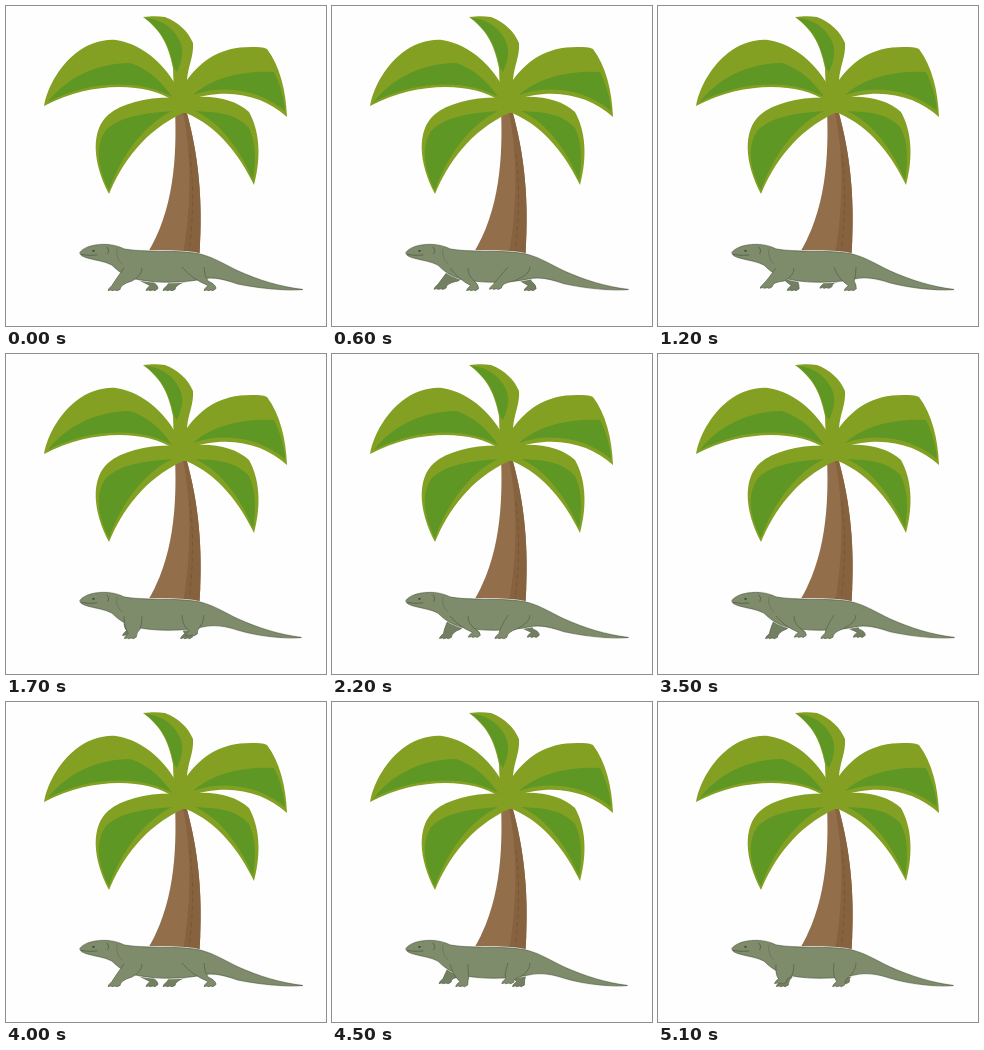
Write an HTML page that moves like this. It is 320 by 320 pixels and loops after 5200 ms.

```html
<!DOCTYPE html>
<html lang="en">
<head>
<meta charset="utf-8">
<title>Lizard under a palm</title>
<style>
  html, body { margin: 0; width: 100%; height: 100%; overflow: hidden; background: #fefefe; }
  svg { display: block; width: 100vw; height: 100vh; }
  .light { fill: #84a022; }
  .dark { fill: #5f9724; }
  .skin { fill: #7e8c6b; stroke: #555f4a; stroke-width: .7; stroke-linejoin: round; }
  .far { fill: #727f61; }
  .line { fill: none; stroke: #4d5644; stroke-width: .7; stroke-linecap: round; }
  .halo { fill: none; stroke: #eeefe9; stroke-width: 2.2; }
</style>
</head>
<body>
<svg viewBox="0 0 320 320">
  <g id="palm">
    <path fill="#936e4a" d="M169 104C171 150 168 205 141 248H193.500C197 195 193 150 180 104Z"/>
    <path fill="#87623f" d="M177 106C186 150 185 205 177 248H193.500C197 195 193 150 180 104Z"/>
    <path fill="none" stroke="#775338" stroke-width=".8" stroke-dasharray="5 3" d="M184 148C188 180 187 215 183 246"/>

    <path class="light" d="M137 11C146 10 152 10 159 11C172 16 182 25 187 37C188 50 182 60 181 74L184 96L168 92L167 62C162 36 153 23 137 11Z"/>
    <path class="dark" d="M139 12C157 13 170 24 175 38C178 48 175 57 171 66L168 62C163 37 154 23 139 12Z"/>

    <path class="light" d="M38 100C42 78 56 58 70 47C82 38 96 33 110 34C138 38 164 62 176 92L168 95C140 76 85 75 38 100Z"/>
    <path class="dark" d="M42 96C60 72 91 57 124 57C143 63 157 77 166 91C138 74 85 73 42 96Z"/>

    <path class="light" d="M181 74C196 54 214 41 245 41C252 41 257 41 261 43C274 60 280 85 281 111C258 90 222 80 180 95Z"/>
    <path class="dark" d="M187 89C204 74 232 64 268 66C274 78 278 91 279 105C256 86 222 77 187 89Z"/>

    <path class="light" d="M178 92C145 90 118 96 102 109C85 124 86 156 103 188C116 157 138 125 177 107Z"/>
    <path class="dark" d="M103 184C91 161 89 139 100 124C116 109 142 107 166 105C136 120 115 151 103 184Z"/>

    <path class="light" d="M170 94C200 87 228 92 243 106C253 124 256 149 248 179C234 150 213 121 180 107L170 107Z"/>
    <path class="dark" d="M247 174C251 151 249 135 243 122C230 107 210 106 189 105C217 118 235 146 247 174Z"/>
  </g>
  <g id="lizard">
    <path id="farHind" class="skin far"/>
    <path id="farFront" class="skin far"/>
    <path id="halo" class="halo"/>
    <path id="body" class="skin"/>
    <g id="face">
      <path class="line" d="M75.500 248.500Q83 250 91 249M101 241Q104 243.500 102 247.500"/>
      <path class="line" stroke-opacity=".5" d="M111 243Q109 252 116 258"/>
      <ellipse cx="87.500" cy="244.800" rx="1.300" ry=".9" fill="#3a4035"/>
    </g>
    <path id="nearHind" class="skin"/>
    <path id="nearFront" class="skin"/>
  </g>
</svg>
<script>
  // The walk restarts after 13 steps, one short of a full 14-step stride.
  const STEP = 100, LOOP = 5200, CLIP = 13, STRIDE = 14;
  const set = (id, d) => document.getElementById(id).setAttribute('d', d);

  // Foot position: a steady push backward, then a lifted swing forward.
  function footAt(phase, front, back, haste) {
    const u = (phase / STRIDE % 1) * 2;
    if (u < 1) return { x: front + (back - front) * u, y: 284.5, push: u };
    const v = u - 1, w = Math.min(1, v * haste);
    return {
      x: back + (front - back) * w * w * (3 - 2 * w),
      y: 284.5 - 3 * Math.sin(Math.PI * v),
      push: 1 - v
    };
  }

  // Open outline from hip to toes and back up, bent at the knee.
  function leg(hipX, hipY, foot, width, bend) {
    const { x, y, push } = foot;
    const kx = (hipX + x) / 2 + bend, ky = 273;
    const heel = y - 1 - push;
    return `M${hipX - width} ${hipY}` +
      `Q${kx - 9} ${ky} ${x - 3} ${y - 5}` +
      `L${x - 6} ${y - 2}L${x - 7} ${y}l3 -.6l1 .8l3 -.7l2 .7` +
      `L${x + 5} ${heel}` +
      `Q${x + 5} ${y - 6} ${kx + 7} ${ky + 2}` +
      `Q${hipX + width} ${hipY + 8} ${hipX + width} ${hipY}`;
  }

  function bodyPath(stretch) {
    const tipX = 296 + stretch * .7;
    return 'M74 246.500C77 242.500 83 240 90 239C100 237.500 110 239 118 243' +
      'C135 246.500 166 244 188 247C204 249 217 258 232 265' +
      `C252 274 274 281 ${tipX} 283.500` +
      `C276 285 250 281.500 232 ${277 + stretch}` +
      `C220 ${273 + stretch} 208 270 196 273C178 277 151 277 135 274` +
      'C121 272 113 266 106 259C99 255 88 254 80 251.500C76 250 74 249 74 246.500Z';
  }

  function draw(n) {
    // Two beats of the walk are held for a second step.
    const phase = (n - (n > 14) - (n > 41)) % CLIP;
    const half = phase + STRIDE / 2;
    const stretch = Math.cos(4 * Math.PI * phase / STRIDE);
    const front = p => leg(127, 262, footAt(p, 109, 147, 1.35), 9, 1);
    const hind = p => leg(187, 261, footAt(p, 164, 205, 1.1), 11, -1);
    const body = bodyPath(stretch);
    set('body', body);
    set('halo', body);
    set('nearFront', front(phase));
    set('farFront', front(half));
    set('nearHind', hind(half));
    set('farHind', hind(phase));
  }

  const start = performance.now();
  function tick() {
    draw(Math.floor((performance.now() - start) % LOOP / STEP));
    requestAnimationFrame(tick);
  }
  tick();
</script>
</body>
</html>
```
